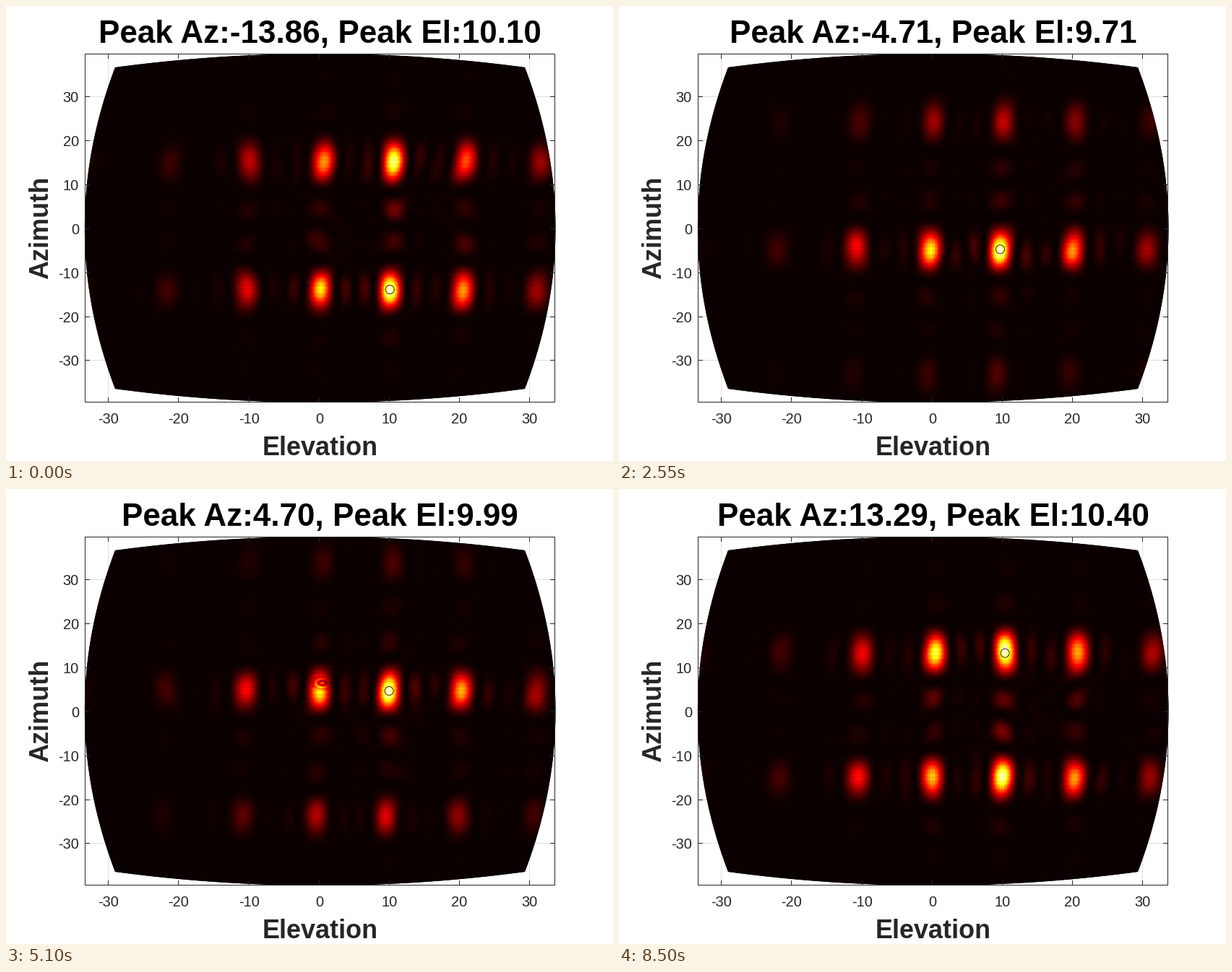
These frames come from a looping animation (840 by 630 pixels, 8.67 s). A matplotlib script:

```python
import numpy as np
import matplotlib.pyplot as plt
from matplotlib.animation import FuncAnimation
from matplotlib.patches import Circle, Polygon

W, H, DPI = 840, 630, 100
FRAMES, INTERVAL = 51, 170
PX = 72 / DPI  # points per pixel
LEFT, RIGHT, TOP, BOTTOM = 109.5, 759.5, 66.5, 548.5
INK = "#262626"

# Peak track: step, azimuth, elevation
TRACK = np.array([
    (0, -13.86, 10.10), (7, -9.35, 9.64), (15, -4.71, 9.71), (21, -1.18, 10.01),
    (30, 4.70, 9.99), (39, 8.19, 9.95), (50, 13.29, 10.40)])

# Grating lobes along elevation: order, centre, relative power
ORDERS = np.arange(-4, 4)
LOBE_EL = np.array([-33, -21.8, -10.4, 0.15, 10, 20.3, 31, 42])
LOBE_POWER = np.array([0.02, 0.09, 0.37, 0.75, 1, 0.62, 0.24, 0.1])
STEP_UP, STEP_DOWN = 30, 29.2  # azimuth spacing of the lobe rows
ROW_WIDTH = 22.5
SKEW = 0.016
SPECKLE = 0.07


def to_x(el):
    return 433.2 + 9.71 * el


def to_y(az):
    return 308.2 - 6.09 * az


def dirichlet(phase):
    """Normalised pattern of a four-element array."""
    return np.cos(np.pi * phase) * np.cos(2 * np.pi * phase)


xs = np.arange(109, 761) + 0.5
ys = np.arange(66, 549) + 0.5
EL = (xs - 433.2) / 9.71
AZ = (308.2 - ys) / 6.09

rng = np.random.default_rng(4)
NX, NY = 27, 18
basis_x = np.cos(np.outer(np.arange(1, NX + 1), (xs - LEFT) * np.pi / 650)
                 + rng.uniform(0, 6.28, (NX, 1)))
basis_y = np.cos(np.outer((ys - TOP) * np.pi / 482, np.arange(1, NY + 1))
                 + rng.uniform(0, 6.28, NY))
noise_phase = rng.uniform(0, 6.28, (2, NY, NX))
noise_speed = rng.uniform(-0.5, 0.5, (2, NY, NX))
noise_taper = np.outer(np.exp(-(AZ / 26) ** 2),
                       np.exp(-((EL - 9) / 24) ** 2) * 0.8 + 0.1)


def ring_defect(el, az, rx, ry, depth):
    r = np.hypot((xs - to_x(el))[None, :] / rx, (ys - to_y(az))[:, None] / ry)
    return 1 - depth * np.sin(1.5 * np.pi * r) ** 2 * np.exp(-r ** 4)


defects = ring_defect(0.5, 6.5, 15, 9, 0.55) * ring_defect(-21.6, 18.6, 9, 7, 0.6)
texture = 1 + 0.03 * np.cos(2 * np.pi * ys / 6)[:, None] * np.ones(len(xs))
texture += 0.02 * np.cos(2 * np.pi * xs / 4)


def peak_at(i):
    return [np.interp(i, TRACK[:, 0], TRACK[:, c]) for c in (1, 2)]


def intensity(i):
    az, el = peak_at(i)
    # The element envelope pulls every lobe inwards, so steer slightly further out
    d_az = AZ - 1.033 * az
    row = d_az / np.where(d_az > 0, STEP_UP, STEP_DOWN)
    rows = np.exp(-AZ ** 2 / (2 * ROW_WIDTH ** 2)) * dirichlet(row)
    rows /= np.abs(rows).max()

    col = np.interp(EL - (el - 10) - SKEW * d_az[:, None], LOBE_EL, ORDERS)
    cols = np.sqrt(LOBE_POWER)[np.rint(col).astype(int) + 4] * dirichlet(col)

    coeffs = np.cos(noise_phase + noise_speed * i) / np.sqrt(NX * NY / 4)
    real, imag = (SPECKLE * noise_taper * (basis_y @ c @ basis_x) for c in coeffs)
    power = (rows[:, None] * cols + real) ** 2 + imag ** 2
    power *= defects * texture
    return power / power.max()


fig = plt.figure(figsize=(W / DPI, H / DPI), dpi=DPI, facecolor="white")
ax = fig.add_axes([0, 0, 1, 1])
ax.axis("off")


def line(x, y, color=INK, z=4):
    ax.plot(x, y, color=color, lw=PX, zorder=z, snap=False,
            solid_capstyle="butt", solid_joinstyle="miter")


def label(x, y, text, size, color=INK, **kw):
    kw = {"ha": "center", "va": "baseline", **kw}
    return ax.text(x, y, text, fontsize=size * PX, color=color,
                   family="Liberation Sans", **kw)


for v in range(-30, 31, 10):
    x, y = np.floor(to_x(v)) + 0.5, np.floor(to_y(v)) + 0.5
    line([x, x], [TOP, BOTTOM], "#dfdfdf", 1)
    line([LEFT, RIGHT], [y, y], "#dfdfdf", 1)
    for edge, d in ((TOP, 6.5), (BOTTOM, -6.5)):
        line([x, x], [edge, edge + d])
    for edge, d in ((LEFT, 6.5), (RIGHT, -6.5)):
        line([edge, edge + d], [y, y])
    label(x, 578, str(v), 20)
    label(101, y + 7.5, str(v), 20, ha="right")
line([LEFT, RIGHT, RIGHT, LEFT, LEFT], [TOP, TOP, BOTTOM, BOTTOM, TOP])

# Barrel-shaped field of view
s = np.linspace(-1, 1, 60)
top = np.c_[434.5 + 283.5 * s, 66 + 19 * s ** 2]
right = np.c_[760.5 - 42.5 * s ** 2, 307.5 + 222.5 * s]
bottom = np.c_[434.5 - 283.5 * s, 549 - 19 * s ** 2]
left = np.c_[108.8 + 42.2 * s ** 2, 307.5 - 222.5 * s]
view = Polygon(np.vstack([top, right, bottom, left]), fc="#0a0000", ec="none", zorder=2)
ax.add_patch(view)

image = ax.imshow(np.zeros((len(ys), len(xs))), cmap="hot", vmin=0, vmax=1,
                  extent=(109, 761, 549, 66), aspect="auto",
                  interpolation="nearest", zorder=3)
image.set_clip_path(view)
ax.set_xlim(0, W)
ax.set_ylim(H, 0)

marker = Circle((0, 0), 6, fill=False, ec="#4a1c20", lw=PX, zorder=5)
ax.add_patch(marker)
title = label(434.5, 50.5, "", 44, "black", weight="bold")
label(435, 622, "Elevation", 36, weight="bold")
label(58, 307, "Azimuth", 36, weight="bold", rotation=90, rotation_mode="anchor")


def update(i):
    az, el = peak_at(i)
    image.set_data(intensity(i))
    marker.center = to_x(el), to_y(az)
    title.set_text(f"Peak Az:{az:.2f}, Peak El:{el:.2f}")
    return image, marker, title


anim = FuncAnimation(fig, update, frames=FRAMES, interval=INTERVAL,
                     repeat=True, repeat_delay=0)
plt.show()
```
